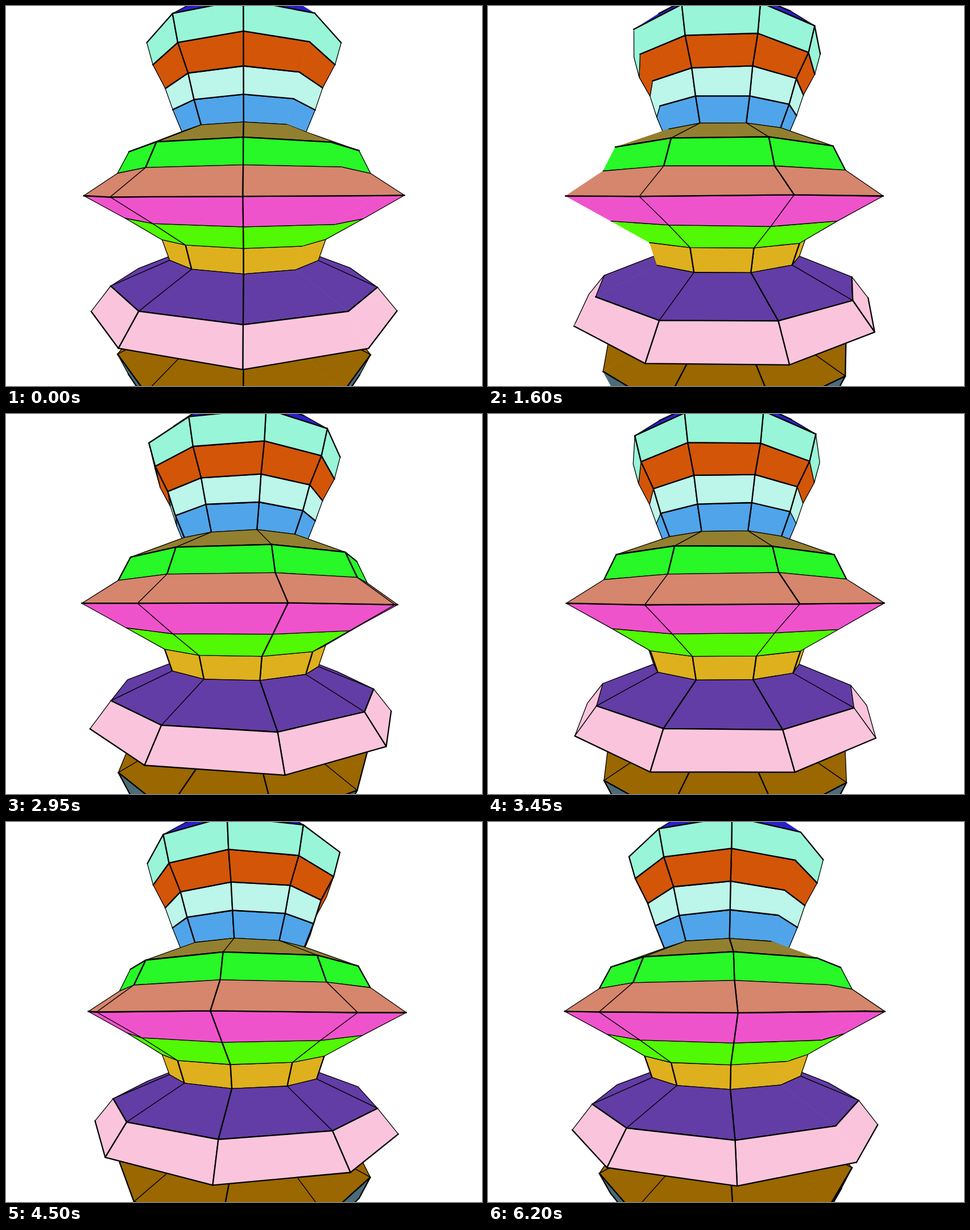
An HTML page that plays this animation: 837 by 669 pixels, repeating every 6250 ms.

```html
<!DOCTYPE html>
<html lang="en">
<head>
<meta charset="utf-8">
<title>Turning lathe shape</title>
<style>
  html, body { margin: 0; width: 100%; height: 100%; overflow: hidden; background: #fff; }
  svg { display: block; width: 100vw; height: 100vh; }
</style>
</head>
<body>
<svg id="stage" viewBox="0 0 837 669"></svg>
<script>
const stage = document.getElementById('stage');
const LOOP = 6250, STEP = 50, FRAMES = LOOP / STEP;
const CX = 418.5, CY = 334.5, FOCAL = 579.4;
const SIDES = 10, RING_GAP = 35.3, MIDDLE = 8, JITTER = 1.2;
const START = 35.75; // angle of the unlined seam, in degrees

const radii = [125, 164, 154.5, 135, 123, 108.3, 191, 208, 256, 197, 140, 128, 218, 245.7, 117, 208, 192];
const colors = ['#2820c8', '#98f5d8', '#d35508', '#bcf5e9', '#50a4e9', '#937f30', '#28f728', '#d5866d',
  '#ef53cb', '#51f904', '#deb01e', '#623da5', '#fac5dc', '#9a6700', '#9a6700', '#4a6c78'];
const thinRings = new Set([5, 7, 9, 10, 11]);
const THIN = 1.3, THICK = 2.3;

// Seeded noise in -1..1
function noise(frame, ring, side) {
  const n = Math.sin(frame * 12.9898 + ring * 78.233 + side * 37.719) * 43758.5453;
  return (n - Math.floor(n)) * 2 - 1;
}

function project(frame, ring, side) {
  const angle = (START - 360 * frame / FRAMES + 360 * side / SIDES) * Math.PI / 180;
  const r = radii[ring], cos = Math.cos(angle), z = r * cos;
  const scale = 1 / (1 - z / FOCAL);
  const y = (ring - MIDDLE) * RING_GAP + JITTER * noise(frame, ring, side);
  return { x: CX + r * Math.sin(angle) * scale, y: CY + y * scale, z, cos };
}

function signedArea(points) {
  return points.reduce((sum, p, i) => {
    const q = points[(i + 1) % points.length];
    return sum + p.x * q.y - q.x * p.y;
  }, 0);
}

const at = p => p.x.toFixed(1) + ' ' + p.y.toFixed(1);
const segment = (p, q) => 'M' + at(p) + 'L' + at(q);

function faceMarkup({ points, band, side }) {
  const [a, b, c, d] = points;
  const lines = { [THIN]: '', [THICK]: '' };
  const rim = (p, q, ring) => {
    const thin = thinRings.has(ring) || p.cos + q.cos < 0.65;
    lines[thin ? THIN : THICK] += segment(p, q);
  };
  const rib = (p, q, index) => {
    if (index % SIDES === 0) return;
    const thin = p.cos < 0.35 || Math.abs(p.x - q.x) > 0.72 * Math.abs(p.y - q.y);
    lines[thin ? THIN : THICK] += segment(p, q);
  };
  rim(a, b, band);
  rim(d, c, band + 1);
  rib(a, d, side);
  rib(b, c, side + 1);
  const fill = colors[band];
  return `<path d="M${points.map(at).join('L')}Z" fill="${fill}" stroke="${fill}" stroke-width=".6"/>` +
    [THIN, THICK].map(w => lines[w] &&
      `<path d="${lines[w]}" fill="none" stroke="#000" stroke-width="${w}" stroke-linecap="round"/>`).join('');
}

function render(frame) {
  const grid = radii.map((_, ring) =>
    Array.from({ length: SIDES }, (_, side) => project(frame, ring, side)));
  const faces = [];
  for (let band = 0; band < colors.length; band++) {
    for (let side = 0; side < SIDES; side++) {
      const next = (side + 1) % SIDES;
      const points = [grid[band][side], grid[band][next], grid[band + 1][next], grid[band + 1][side]];
      if (signedArea(points) <= 0) continue;
      faces.push({ points, band, side, depth: points.reduce((sum, p) => sum + p.z, 0) });
    }
  }
  faces.sort((p, q) => p.depth - q.depth);
  stage.innerHTML = faces.map(faceMarkup).join('');
}

const began = performance.now();
let shown = -1;
function tick() {
  const frame = Math.floor((performance.now() - began) % LOOP / STEP);
  if (frame !== shown) render(shown = frame);
  requestAnimationFrame(tick);
}
tick();
</script>
</body>
</html>
```
